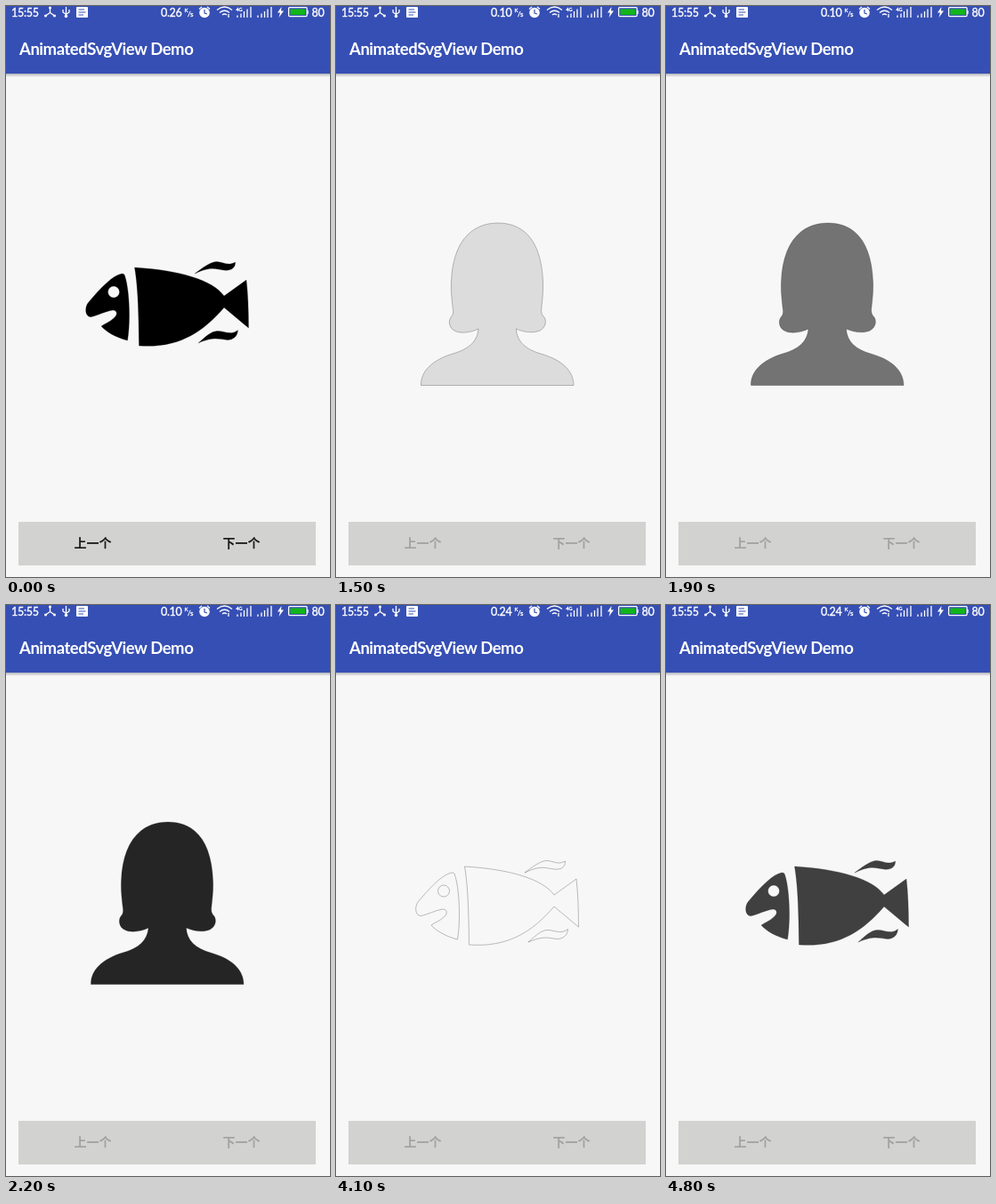
These frames come from a looping animation (364 px wide and 642 px high, 4900 ms). An HTML page:

```html
<!DOCTYPE html>
<html lang="zh">
<head>
<meta charset="utf-8">
<title>AnimatedSvgView Demo</title>
<style>
html, body { margin: 0; width: 100%; height: 100%; overflow: hidden; background: #f7f7f7; }
svg { display: block; width: 364px; height: 642px; }
text { font-family: Lato, "Open Sans", sans-serif; }
.title { font-size: 18.5px; font-weight: 700; letter-spacing: -.45px; fill: #fff; }
.status { fill: #fff; font-size: 12.5px; stroke: #fff; stroke-width: .35; letter-spacing: -.3px; }
.icon { fill: none; stroke: #fff; stroke-width: 1.3; }
.label { font: 700 14px "Noto Sans CJK SC", "Noto Sans CJK", sans-serif; text-anchor: middle; }

/* Every clip shares one 4.9 s timeline. */
.clip { animation: 4.9s linear infinite; }
.step { animation-timing-function: step-end; }

.fill { fill: #000; fill-rule: evenodd; }
.line { fill: none; stroke: #000; }
.residue { stroke-opacity: .25; stroke-dasharray: 900; }
.marker { stroke-width: 1.3; stroke-dasharray: 50 1000; }

#person { animation-name: person-show; }
#person .fill { animation-name: person-fill; }
#person .residue { --from: 900px; --to: 140px; }
#person .marker { --from: 0px; --to: -760px; }
#person .line { animation-name: person-trace; }
@keyframes person-show {
  0%, 60.918% { visibility: hidden; }
  6.122% { visibility: visible; }
}
@keyframes person-fill {
  0%, 28.571% { fill-opacity: 0; }
  47.755%, 100% { fill-opacity: 1; }
}
@keyframes person-trace {
  0%, 5.918% { stroke-dashoffset: var(--from); animation-timing-function: cubic-bezier(.3333, .6667, .6667, 1); }
  26.327%, 100% { stroke-dashoffset: var(--to); }
}

#fish { animation-name: fish-show; }
#fish .fill { animation-name: fish-fill; }
#fish .residue { --from: 900px; --to: 460px; }
#fish .marker { --from: 0px; --to: -440px; }
#fish .line { animation-name: fish-trace; }
@keyframes fish-show {
  0%, 60.918% { visibility: visible; }
  6.122% { visibility: hidden; }
}
@keyframes fish-fill {
  0%, 6.13% { fill-opacity: 1; }
  6.14%, 83.673% { fill-opacity: 0; }
  100% { fill-opacity: .844; }
}
@keyframes fish-trace {
  0%, 6.13% { stroke-dashoffset: var(--to); }
  6.14% { stroke-dashoffset: var(--from); }
  60.98% { stroke-dashoffset: var(--from); animation-timing-function: cubic-bezier(.3333, .6667, .6667, 1); }
  81.388%, 100% { stroke-dashoffset: var(--to); }
}

.label { animation-name: enable; }
@keyframes enable {
  0%, 48.979% { fill: #1c1c1c; }
  6.122%, 60.918% { fill: #a2a2a0; }
}
#press { animation-name: press; }
@keyframes press {
  0%, 69.388% { opacity: 0; }
  59.184% { opacity: 1; }
}
#rate1 { animation-name: rate1; }
#rate2 { animation-name: rate2; }
#rate3 { animation-name: rate3; }
@keyframes rate1 { 0% { opacity: 1; } 20.408%, 100% { opacity: 0; } }
@keyframes rate2 { 0%, 79.592% { opacity: 0; } 20.408% { opacity: 1; } }
@keyframes rate3 { 0% { opacity: 0; } 79.592%, 100% { opacity: 1; } }
</style>
</head>
<body>
<svg viewBox="0 0 364 642">
  <defs>
    <linearGradient id="shade" x2="0" y2="1">
      <stop stop-color="#b4b4b8"/>
      <stop offset="1" stop-color="#f7f7f7"/>
    </linearGradient>
    <path id="woman" d="M160 363C152 367 140 369 133 365C127 362 126 354 129 350C132 347 132 344 131 338C130 328 129 320 129.5 310C131 268 150 244 182 244C214 244 231 268 232.5 310C233 320 232 328 231 338C230 344 231 347 234 350C237 355 235 362 229 365C222 368 211 367 202.5 363C203 377 213 386 230 391C255 398 267 411 267 426.5L95.5 426.5C95 411 108 398 131 391C149 386 159 377 160 363Z"/>
    <path id="swimmer" d="M130 301C120 303 108 315 92 334C88 340 89 350 96 349.5C103 348 112 343 120 342C125 342 126 347 121 351C117 355 111 357 107 360C112 366 124 373 136.5 376C140 356 139 318 133 302C132 301 131 301 130 301Z
      M127.5 321.5A6.5 6.5 0 1 1 114.5 321.5A6.5 6.5 0 1 1 127.5 321.5Z
      M245 339L272.5 362Q272.5 330 270 308L245 326C232 308 195 297 144.5 294C148 315 149 340 149.5 382C193 385 220 368 245 339Z
      M245 297C252 298 258 295 257.5 288C249 293 243 287 236 287.5C229 288 220 295 212 301C230 292 236 296 245 297Z
      M260.5 364.5C252 371 245 365 237 365.5C230 366 224 372 216 379C234 371 240 375 249 375.5C255 375 260 372 260.5 364.5Z"/>
  </defs>

  <rect width="364" height="642" fill="#f7f7f7"/>
  <rect y="76" width="364" height="4" fill="url(#shade)"/>
  <rect width="364" height="76" fill="#364fb4"/>
  <text class="title" x="15" y="55">AnimatedSvgView Demo</text>

  <g class="status">
    <text x="6" y="11.5">15:55</text>
    <text id="rate1" class="clip step" x="174" y="11.5">0.26</text>
    <text id="rate2" class="clip step" x="174" y="11.5">0.10</text>
    <text id="rate3" class="clip step" x="174" y="11.5">0.24</text>
    <text x="200.5" y="7" font-size="6">K</text>
    <text x="204" y="11.5" font-size="8">/s</text>
    <text x="343.5" y="11.5">80</text>
    <text x="258.5" y="5.5" font-size="5.5">4G</text>
  </g>
  <g class="icon">
    <path d="M49.5 2V7.5L44.5 11M49.5 7.5L54.5 11"/>
    <path d="M67.5 1V12M64 4V7L67.5 9.5L71 7V4"/>
    <path d="M237 4.5Q245.5 -2.5 254 4.5M240 7.5Q245.5 3 251 7.5M243 10Q245.5 8 248 10M250 9V13"/>
    <path d="M260 10.5V13M264 8.5V13M267.5 6V13M271 3.5V13M275 1V13M283 10.5V13M287 8.5V13M290.5 6V13M294 3.5V13M298 1V13"/>
    <path d="M217 3.5L220 1M226 1L229 3.5"/>
    <rect x="317.6" y="1.6" width="20.5" height="10" rx="1"/>
    <path d="M339 5V9"/>
  </g>
  <g fill="#fff">
    <circle cx="49.5" cy="2" r="1.5"/>
    <circle cx="44.5" cy="11" r="1.5"/>
    <circle cx="54.5" cy="11" r="1.5"/>
    <circle cx="67.5" cy="11.5" r="1.8"/>
    <rect x="79" y="1" width="13" height="12" rx="1"/>
    <circle cx="223" cy="7.5" r="5.8"/>
    <path d="M309.5 1L305 7.5H308L306.5 13L312 5.5H309Z"/>
  </g>
  <path d="M81.5 4H88M81.5 7H89.5M81.5 10H87M223 4V8L226 9" fill="none" stroke="#364fb4" stroke-width="1.2"/>
  <rect x="319.5" y="3.5" width="16.5" height="6.5" fill="#12b51b"/>

  <g id="person" class="clip step">
    <use href="#woman" class="fill clip"/>
    <use href="#woman" class="line residue clip"/>
    <use href="#woman" class="line marker clip"/>
  </g>
  <g id="fish" class="clip step">
    <use href="#swimmer" class="fill clip"/>
    <use href="#swimmer" class="line residue clip"/>
    <use href="#swimmer" class="line marker clip"/>
  </g>

  <rect x="14" y="580" width="334" height="49" fill="#d2d2d0"/>
  <rect id="press" class="clip step" x="14" y="580" width="167" height="49" fill="#cfcfcd"/>
  <text class="label clip step" x="97.5" y="608.5">上一个</text>
  <text class="label clip step" x="264.5" y="608.5">下一个</text>
</svg>
</body>
</html>
```
